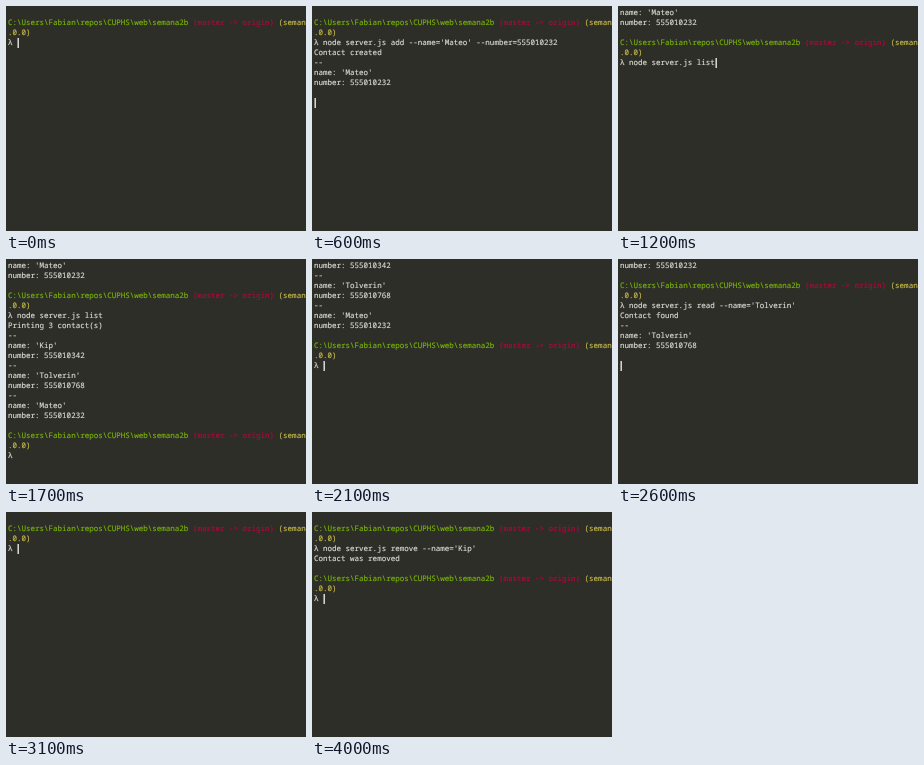
Write an HTML page that moves like this. It is 300 by 225 pixels and loops after 4.1 s.

```html
<!DOCTYPE html>
<html lang="en">
<head>
<meta charset="utf-8">
<title>Contacts terminal</title>
<style>
  html, body {
    margin: 0;
    width: 100%;
    height: 100%;
    overflow: hidden;
    background: #2d2e28;
  }
  #screen {
    position: absolute;
    left: 2px;
    top: 2px;
    margin: 0;
    color: #dcdcd6;
    font: 500 7.525px/10px "Noto Sans Mono", monospace;
    text-rendering: geometricPrecision;
    -webkit-text-stroke: 0.15px;
    font-variant-ligatures: none;
    white-space: pre;
  }
  .path { color: #78b408; }
  .branch { color: #b40838; }
  .pkg { color: #c8bc48; }
  #cursor {
    position: absolute;
    width: 2px;
    height: 10px;
    background: linear-gradient(90deg, #8a8a86 50%, #d4d4d0 50%);
  }
</style>
</head>
<body>
<pre id="screen"></pre>
<div id="cursor"></div>
<script>
const STEP = 100, ROW = 10, COL = 4.515, PAD = 2;
const screen = document.getElementById('screen');
const cursor = document.getElementById('cursor');

const span = (cls, text) => `<span class="${cls}">${text}</span>`;
const PROMPT = [
  span('path', String.raw`C:\Users\Fabian\repos\CUPHS\web\semana2b`) + ' ' +
    span('branch', '(master -&gt; origin)') + ' ' + span('pkg', '(seman'),
  span('pkg', '.0.0)'),
  'λ '
];
const contact = (name, number) => ['--', `name: '${name}'`, `number: ${number}`];
const kip = contact('Kip', '555010342');
const tolverin = contact('Tolverin', '555010768');
const mateo = contact('Mateo', '555010232');

// Each step stores one screen state
const steps = [];
let lines = [''];

function snap(on = true) {
  const last = lines[lines.length - 1];
  steps.push({ html: lines.join('\n'), row: lines.length - 1, col: last.length, on });
}
function prompt(on) {
  lines.splice(-1, 1, ...PROMPT);
  snap(on);
}
function type(cmd, ...stops) {
  for (const n of stops) {
    lines[lines.length - 1] = 'λ ' + cmd.slice(0, n);
    snap();
  }
}
function run(...out) {
  lines.push(...out, '', '');
  snap();
}
function scroll(rows, on) {
  lines.splice(0, rows);
  snap(on);
}
function clear(on) {
  lines = ['', ''];
  prompt(on);
}
const blink = (...states) => states.forEach(on => snap(on));

clear(true);
type("node server.js add --name='Mateo' --number=555010232", 10, 20, 31, 42, 52);
run('Contact created', ...mateo);
prompt(false);
scroll(3, true);
scroll(3, false);
type('node server.js list', 5, 14, 19);
run('Printing 3 contact(s)', ...kip, ...tolverin, ...mateo);
prompt(true);
blink(false, true, false, false);
scroll(3, true);
scroll(3, false);
scroll(3, true);
scroll(6, false);
type("node server.js read --name='Tolverin'", 10, 24, 37);
run('Contact found', ...tolverin);
prompt(false);
blink(true);
type('clear', 5);
clear(false);
blink(true);
type("node server.js remove --name='Kip'", 11, 22, 34);
run('Contact was removed');
prompt(true);
blink(false, true, false, true);

let shown = -1;
function draw(time) {
  const i = Math.floor(time / STEP) % steps.length;
  if (i === shown) return;
  shown = i;
  const { html, row, col, on } = steps[i];
  screen.innerHTML = html;
  cursor.style.left = Math.round(PAD + col * COL) + 'px';
  cursor.style.top = PAD + row * ROW + 'px';
  cursor.style.visibility = on ? 'visible' : 'hidden';
}
const start = performance.now();
function loop() {
  draw(performance.now() - start);
  requestAnimationFrame(loop);
}
loop();
</script>
</body>
</html>
```
